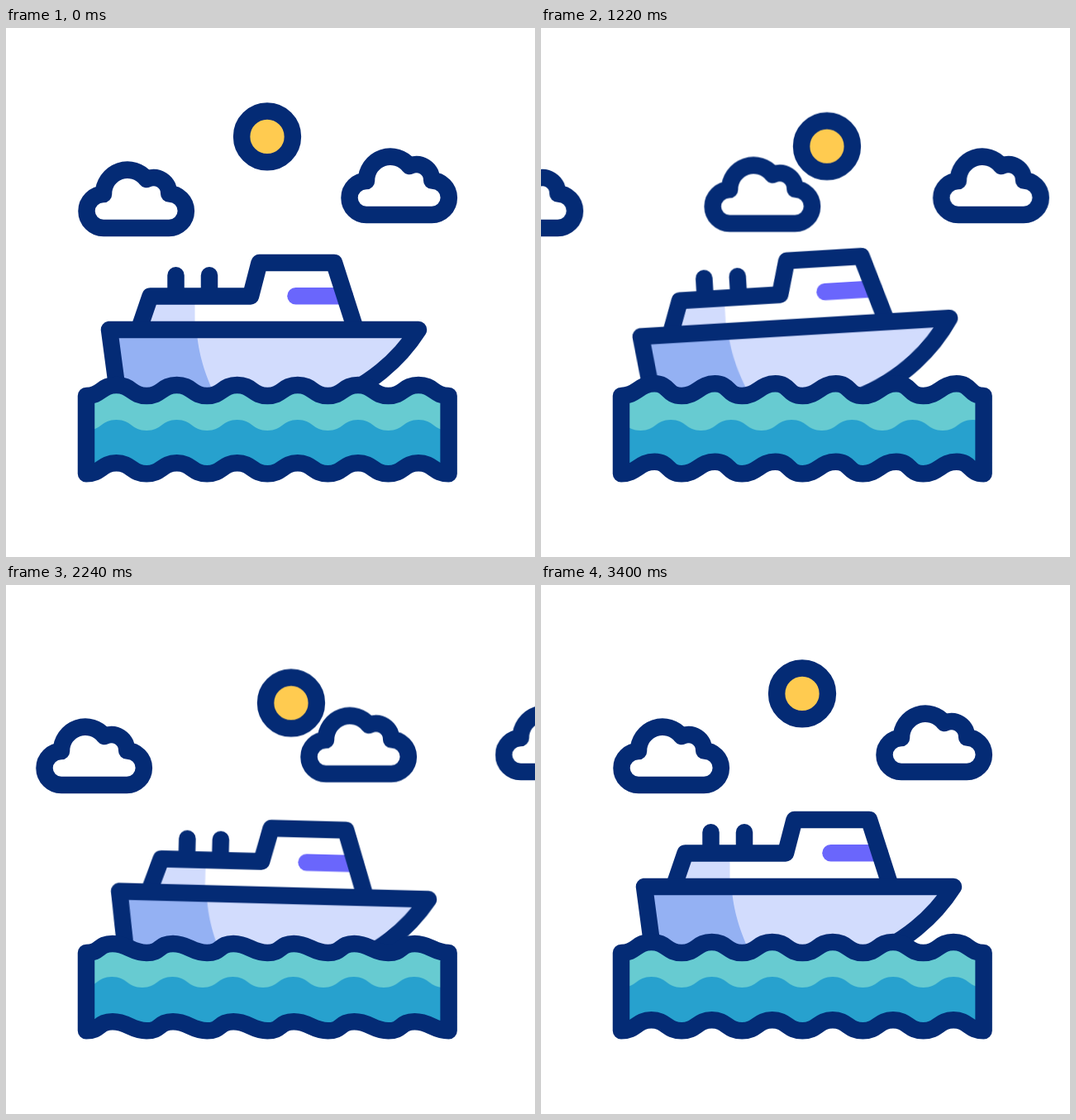
An HTML page that plays this animation: 640 by 640 pixels, repeating every 3.54 s.

```html
<!DOCTYPE html>
<html lang="en">
<head>
<meta charset="utf-8">
<title>Ship at sea</title>
<style>
  html, body { margin: 0; width: 100%; height: 100%; overflow: hidden; background: #fff; }
  svg { display: block; width: 100%; height: 100%; }

  .line { fill: none; stroke: #042b75; stroke-width: 20.5; stroke-linecap: round; stroke-linejoin: round; }
  .white { fill: #fff; }
  .light { fill: #d2dcfd; }
  .mid { fill: #94b1f3; }

  .move { animation: 3540ms cubic-bezier(.333, 0, .667, 1) infinite; }
  .sun { animation-name: sun; }
  .enter { animation-name: enter; }
  .cross { animation-name: cross; }
  .leave { animation-name: leave; }
  .drift { animation-name: drift; }
  .sway { animation-name: sway; }
  .rock { animation-name: rock; transform-origin: 312px 435px; }

  @keyframes sun {
    0%, 1.2%, 87.3%, 100% { transform: translate(0, 0); }
    49.7%, 51.3% { transform: translate(39px, 15.2px); }
  }
  @keyframes enter {
    0%, 3.76% { transform: translate(-255px, 0); }
    87.3%, 100% { transform: translate(0, 0); }
  }
  @keyframes cross {
    0%, 2.4% { transform: translate(0, 0); }
    83.4%, 100% { transform: translate(318px, -16px); }
  }
  @keyframes leave {
    0%, 4.7% { transform: translate(318px, -16px); }
    89%, 100% { transform: translate(558px, -16px); }
  }
  @keyframes drift {
    0%, 6.95% { transform: translate(0, 0); }
    96.36%, 100% { transform: translate(-219.3px, 0); }
  }
  @keyframes sway {
    0%, 76.8%, 100% { transform: translate(0, 0); }
    22.6% { transform: translate(11.2px, 11px); }
    41.8% { transform: translate(-5.8px, -9.7px); }
    61% { transform: translate(10.9px, 11px); }
  }
  @keyframes rock {
    0%, 76.8%, 100% { transform: rotate(0deg); }
    13.56% { transform: rotate(2.65deg); }
    35.9% { transform: rotate(-3.5deg); }
    59.6% { transform: rotate(1.7deg); }
  }
</style>
</head>
<body>
<svg viewBox="0 0 640 640">
  <defs>
    <path id="cloud" d="M118 242H197A20.5 20.5 0 0 0 197.2 200.5A18.8 18.8 0 0 0 170 183A29 29 0 0 0 118 201A20.5 20.5 0 0 0 118 242Z"/>
    <path id="sea"/>
    <clipPath id="basin"><use href="#sea"/></clipPath>
  </defs>

  <g class="move sun">
    <circle class="line" cx="316" cy="131.4" r="30.9" style="fill:#ffcb50"/>
  </g>
  <use href="#cloud" class="line white move enter"/>
  <use href="#cloud" class="line white move leave"/>
  <use href="#cloud" class="line white move cross"/>

  <g class="move sway">
    <g class="move rock">
      <path class="white" d="M161 365L174.5 324.5H296L306.5 284H397L423 365Z"/>
      <path class="light" d="M161 365L174.5 324.5H228.5V365Z"/>
      <path d="M350.5 324.3H410" fill="none" stroke="#6a66fc" stroke-width="20.5" stroke-linecap="round"/>
      <path class="line" d="M205.5 299.3V322M246 299.3V322"/>
      <path class="line" d="M161 364L174.5 324.5H296L306.5 284H397L423 365"/>
      <path class="light" d="M125 365H499C478 398 440 436 380 455H137Z"/>
      <path class="mid" d="M125 365H230.5C233 395 240 418 256 452L137 455Z"/>
      <path class="line" d="M125 365H499C478 398 440 436 380 455H137Z"/>
    </g>
  </g>

  <use href="#sea" fill="#27a1ce"/>
  <g clip-path="url(#basin)">
    <path id="shallows" class="move drift" fill="#67cbd1"/>
  </g>
  <use href="#sea" class="line"/>
</svg>
<script>
  const LOOP = 3540, WIDTH = 73.1, HANDLE = 18.3;
  const SKEW = [[0, 0], [880, 1.05], [1850, -1], [2720, 0], [LOOP, 0]];
  const sea = document.getElementById('sea');

  // Value at time t, eased between [time, value] keys
  function valueAt(keys, t) {
    const i = keys.findIndex(key => key[0] > t);
    const [t0, v0] = keys[i - 1], [t1, v1] = keys[i];
    const u = (t - t0) / (t1 - t0);
    return v0 + (v1 - v0) * u * u * (3 - 2 * u);
  }

  // Run of n waves from trough to trough; dir -1 runs leftwards
  function waves(n, height, lean, dir) {
    const curve = (w, h) => `c${dir * HANDLE} 0 ${dir * (w - HANDLE)} ${h} ${dir * w} ${h}`;
    const rise = WIDTH / 2 + lean * dir;
    return (curve(rise, -height) + curve(WIDTH - rise, height)).repeat(n);
  }

  function draw(time) {
    const skew = valueAt(SKEW, time % LOOP);
    const height = 13 + 3.5 * skew, lean = 8 * skew;
    sea.setAttribute('d',
      `M97 445${waves(6, height, lean, 1)}V539.3${waves(6, height, lean, -1)}Z`);
  }

  document.getElementById('shallows').setAttribute('d',
    `M97 415V487${waves(10, 13, 0, 1)}V415Z`);

  let start;
  function tick(now) {
    start ??= now;
    draw(now - start);
    requestAnimationFrame(tick);
  }
  draw(0);
  requestAnimationFrame(tick);
</script>
</body>
</html>
```
